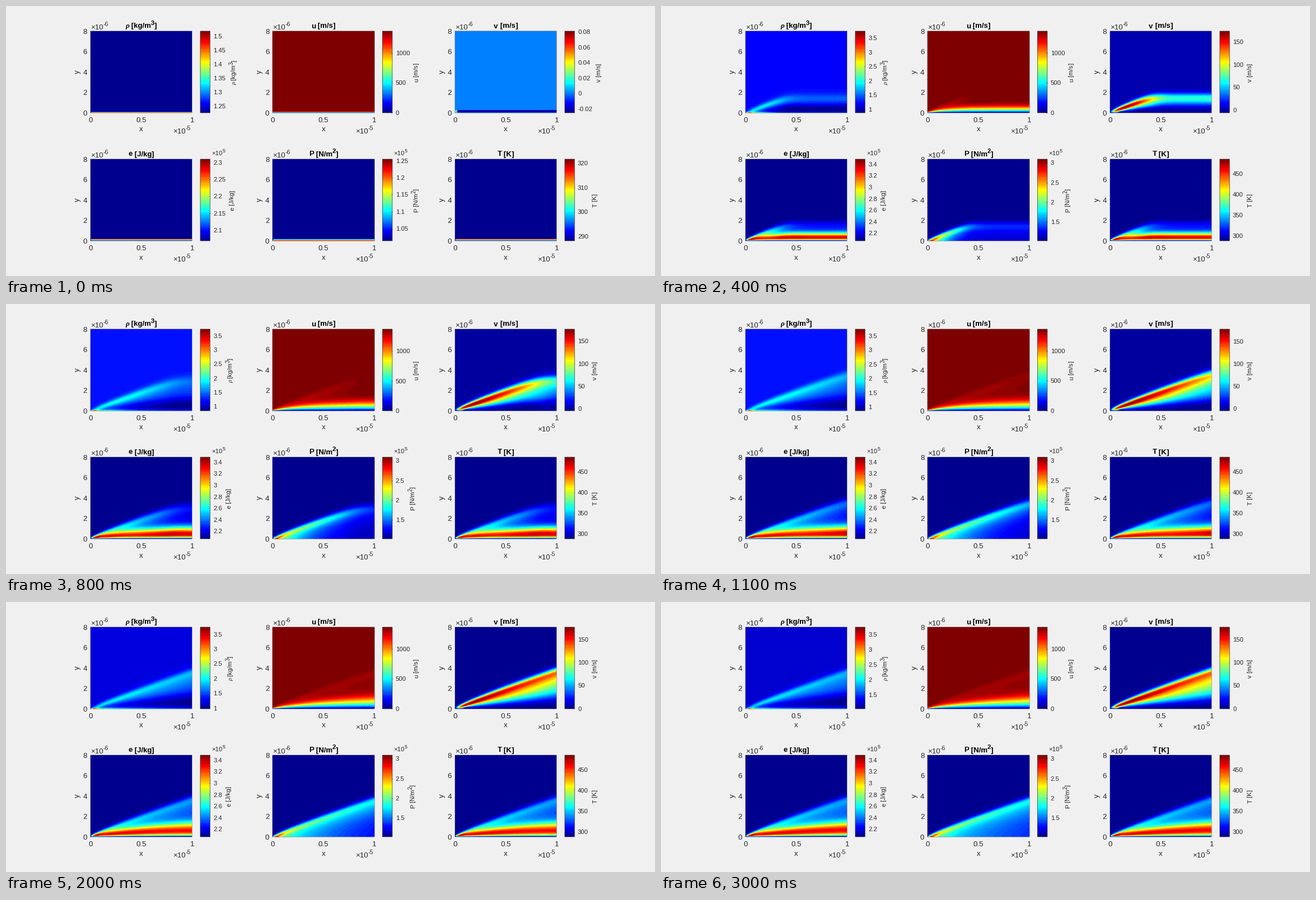
Recreate the animation shown at these times as a matplotlib script. Size 1159x483 px, loop 3100 ms.

```python
import numpy as np
import matplotlib
import matplotlib.pyplot as plt
from matplotlib.animation import FuncAnimation
from matplotlib.colors import ListedColormap
from matplotlib.patches import Rectangle

matplotlib.rcParams['font.family'] = 'Liberation Sans'

# ---- Mach 4 flow over a flat plate, MacCormack scheme ----
NX, NY = 75, 80
DX, DY = 1e-5 / (NX - 1), 8e-6 / (NY - 1)
DT = 1.9e-11
FRAMES, STRIDE = 31, 52
CP, CV, GAS, PR = 1005.0, 718.0, 287.0, 0.71
T_INF, P_INF, MU_0, S = 288.15, 101325.0, 1.789e-5, 110.4
U_INF = 4 * np.sqrt(1.4 * GAS * T_INF)


def slope(f, h, side):
    """Derivative along axis 0: forward (1), backward (-1) or central (0)."""
    g = (f[1:] - f[:-1]) / h
    d = np.empty_like(f)
    d[0], d[-1] = g[0], g[-1]
    if side > 0:
        d[:-1] = g
    elif side < 0:
        d[1:] = g
    else:
        d[1:-1] = 0.5 * (g[1:] + g[:-1])
    return d


def ddx(f, side):
    return slope(f, DX, side)


def ddy(f, side):
    return slope(f.T, DY, side).T


def bound(u, v, T, p):
    """Apply boundary conditions in place and return the full state."""
    for q, far in ((u, U_INF), (v, 0), (T, T_INF), (p, P_INF)):
        q[-1] = 2 * q[-2] - q[-3]
        q[0] = far
        q[:, -1] = far
    u[:, 0] = v[:, 0] = 0
    T[:, 0] = T_INF
    p[1:, 0] = 2 * p[1:, 1] - p[1:, 2]
    p[0, 0] = P_INF
    return p / (GAS * T), u, v, T, p


def conserved(state):
    rho, u, v, T, _ = state
    return np.array([rho, rho * u, rho * v,
                     rho * (CV * T + 0.5 * (u * u + v * v))])


def primitive(U):
    rho = U[0]
    u, v = U[1] / rho, U[2] / rho
    T = (U[3] / rho - 0.5 * (u * u + v * v)) / CV
    return bound(u, v, T, rho * GAS * T)


def fluxes(state, U, side):
    """Fluxes in x and y; inner derivatives run against the outer side."""
    rho, u, v, T, p = state
    r = T / T_INF
    mu = MU_0 * r * np.sqrt(r) * (T_INF + S) / (T + S)
    k = mu * CP / PR
    ux, vx = ddx(u, -side), ddx(v, -side)
    uy, vy = ddy(u, -side), ddy(v, -side)
    uxc, vxc = ddx(u, 0), ddx(v, 0)
    uyc, vyc = ddy(u, 0), ddy(v, 0)

    txx = mu * (4 * ux - 2 * vyc) / 3
    txy = mu * (uyc + vx)
    h = U[3] + p
    ruv = U[1] * v
    E = np.array([U[1], U[1] * u + p - txx, ruv - txy,
                  h * u - u * txx - v * txy - k * ddx(T, -side)])
    tyy = mu * (4 * vy - 2 * uxc) / 3
    txy = mu * (uy + vxc)
    G = np.array([U[2], ruv - txy, U[2] * v + p - tyy,
                  h * v - u * txy - v * tyy - k * ddy(T, -side)])
    return E, G


def advance(state, U, side):
    E, G = fluxes(state, U, side)
    m = slice(1, -1)
    a, b = (slice(2, None), m) if side > 0 else (m, slice(None, -2))
    V = U.copy()
    V[:, m, m] -= DT * ((E[:, a, m] - E[:, b, m]) / DX
                        + (G[:, m, a] - G[:, m, b]) / DY)
    return V


def simulate():
    shape = (NX, NY)
    state = bound(np.full(shape, U_INF), np.zeros(shape),
                  np.full(shape, T_INF), np.full(shape, P_INF))
    shots = []
    for n in range(1, (FRAMES - 1) * STRIDE + 1):
        U = conserved(state)
        mid = primitive(advance(state, U, 1))
        state = primitive(0.5 * (U + advance(mid, conserved(mid), -1)))
        if n == 1 or n % STRIDE == 0:
            rho, u, v, T, p = state
            shots.append([q.T.copy() for q in
                          (rho, u, v, CV * T / 1e5, p / 1e5, T)])
    return shots


# ---- Drawing, in pixels from the top left ----
W, H, DPI = 1159, 483, 128
PW, PH, BAR_DX, BAR_W = 181.6, 146, 196.2, 17.4
BIG, SMALL = 13.33, 11.2
DARK = (0.15, 0.15, 0.15)

# 64-level jet: three shifted trapezoids
level = np.arange(1, 65)[:, None] / 64
JET = ListedColormap(np.clip(1.5 - abs(4 * level - [3, 2, 1]), 0, 1))


def pt(px):
    return px * 72 / DPI


fig = plt.figure(figsize=(W / DPI, H / DPI), dpi=DPI, facecolor='#f0f0f0')
page = fig.add_axes([0, 0, 1, 1], zorder=5)
page.axis('off')


def label(x, y, s, size=BIG, ha='center', **kw):
    kw.setdefault('color', DARK)
    return page.text(x, y, s, fontsize=pt(size), ha=ha, va='baseline',
                     rotation_mode='anchor', **kw)


def measure(s, size, **kw):
    """Advance width, keeping outer spaces."""
    wide = []
    for probe in ('|' + s + '|', '||'):
        t = label(0, 0, probe, size, **kw)
        wide.append(t.get_window_extent().width)
        t.remove()
    return wide[0] - wide[1]


def compose(x, y, name, unit, sup, size, turn=False, **kw):
    """Centred 'name [unit^sup]'; returns the texts with their rise."""
    greek = dict(kw, family='Liberation Serif', style='italic')
    runs = [(name, size, 0, greek if name == 'ρ' else kw),
            (f' [{unit}', size, 0, kw),
            (sup, 0.85 * size, 0.4 * size, kw),
            (']', size, 0, kw)]
    widths = [measure(s, px, **style) for s, px, _, style in runs]
    at, made = -sum(widths) / 2, []
    for (s, px, rise, style), width in zip(runs, widths):
        pos = (x - rise, y - at) if turn else (x + at, y - rise)
        t = label(*pos, s, px, 'left', rotation=90 * turn, **style)
        made.append((t, rise))
        at += width
    return made


def power(x, y, exp, size):
    label(x, y, '×10', size, 'left')
    label(x + measure('×10', size), y - 0.42 * size, exp, 0.8 * size, 'left')


def text_width(s):
    return SMALL * sum({'.': 0.278, '-': 0.333}.get(c, 0.556) for c in s)


class Panel:
    def __init__(self, x, y, name, unit, sup, steps, scaled):
        self.y, self.steps = y, steps
        self.bar = x + BAR_DX
        self.right = self.bar + BAR_W
        self.shift = 3 if sup else 0
        base = y + PH

        left, width = round(x), round(x + PW) - round(x)
        ax = fig.add_axes([left / W, 1 - base / H, width / W, PH / H])
        self.im = ax.imshow(np.zeros((NY, NX)), cmap=JET, origin='lower',
                            aspect='auto', interpolation='bilinear',
                            interpolation_stage='data')
        ax.set(xlim=(0, NX - 1), ylim=(0, NY - 1))
        ax.axis('off')
        ax.add_patch(Rectangle((0, 0), 1, 1, transform=ax.transAxes,
                               fill=False, ec=DARK, lw=pt(0.67), snap=False,
                               clip_on=False, zorder=-1))

        for i, s in enumerate(('0', '0.5', '1')):
            label(x + PW * i / 2, base + 17, s)
        for i in range(5):
            label(x - 6, base - PH * i / 4 + 4.7, str(2 * i), ha='right')
        label(x + PW / 2, base + 33.5, 'x')
        label(x - 20, y + PH / 2, 'y', rotation=90)
        power(x, y - 3, '-6', BIG)
        power(x + 147.5, base + 37, '-5', BIG)

        compose(x + PW / 2, y - 5.5, name, unit, sup, BIG, weight='bold',
                color='black')
        self.side = compose(0, y + PH / 2 + 1, name, unit, sup, SMALL, True)

        page.imshow(np.arange(64)[:, None], cmap=JET, origin='lower',
                    aspect='auto', interpolation='nearest',
                    extent=(round(self.bar), round(self.right), base, y))
        page.add_patch(Rectangle((self.bar, y), BAR_W, PH, fill=False,
                                 ec=DARK, lw=pt(0.67), snap=False))
        self.marks = page.hlines([], 0, 0, color=[DARK], lw=pt(0.67))
        self.ticks = [label(0, 0, '', SMALL, 'left') for _ in range(10)]
        if scaled:
            power(self.right + 2.5, y - 7, '5', SMALL)

    def show(self, data, step):
        lo, hi = data.min(), data.max()
        self.im.set_data(data)
        self.im.set_clim(lo, hi)
        first = int(np.ceil(lo / step - 1e-9))
        last = int(np.floor(hi / step + 1e-9))
        right = self.right
        values = [k * step for k in range(first, last + 1)][:len(self.ticks)]
        words = [f'{round(v, 4):g}' for v in values]
        rows = [self.y + PH * (hi - v) / (hi - lo) for v in values]
        for t in self.ticks:
            t.set_text('')
        for t, s, row in zip(self.ticks, words, rows):
            t.set_text(s)
            t.set_position((right + 5.8, row + 4))
        self.marks.set_segments([[(right - 1.5, r), (right, r)] for r in rows])
        wide = max(map(text_width, words), default=0)
        for t, rise in self.side:
            t.set_x(right + 21.3 + wide + self.shift - rise)


LEFT, GAP, ROWS = 150.8, 325.45, (45, 274)
SPECS = [
    ('ρ', 'kg/m', '3', (0.05, 0.5), False),
    ('u', 'm/s', '', (500, 500), False),
    ('v', 'm/s', '', (0.02, 50), False),
    ('e', 'J/kg', '', (0.05, 0.2), True),
    ('P', 'N/m', '2', (0.05, 0.5), True),
    ('T', 'K', '', (10, 50), False),
]
panels = [Panel(LEFT + GAP * (i % 3), ROWS[i // 3], *spec)
          for i, spec in enumerate(SPECS)]
page.set(xlim=(0, W), ylim=(H, 0))
shots = simulate()


def update(n):
    for panel, data in zip(panels, shots[n]):
        panel.show(data, panel.steps[min(n, 1)])
    return []


anim = FuncAnimation(fig, update, frames=FRAMES, interval=100, repeat=True,
                     repeat_delay=0)
plt.show()
```
